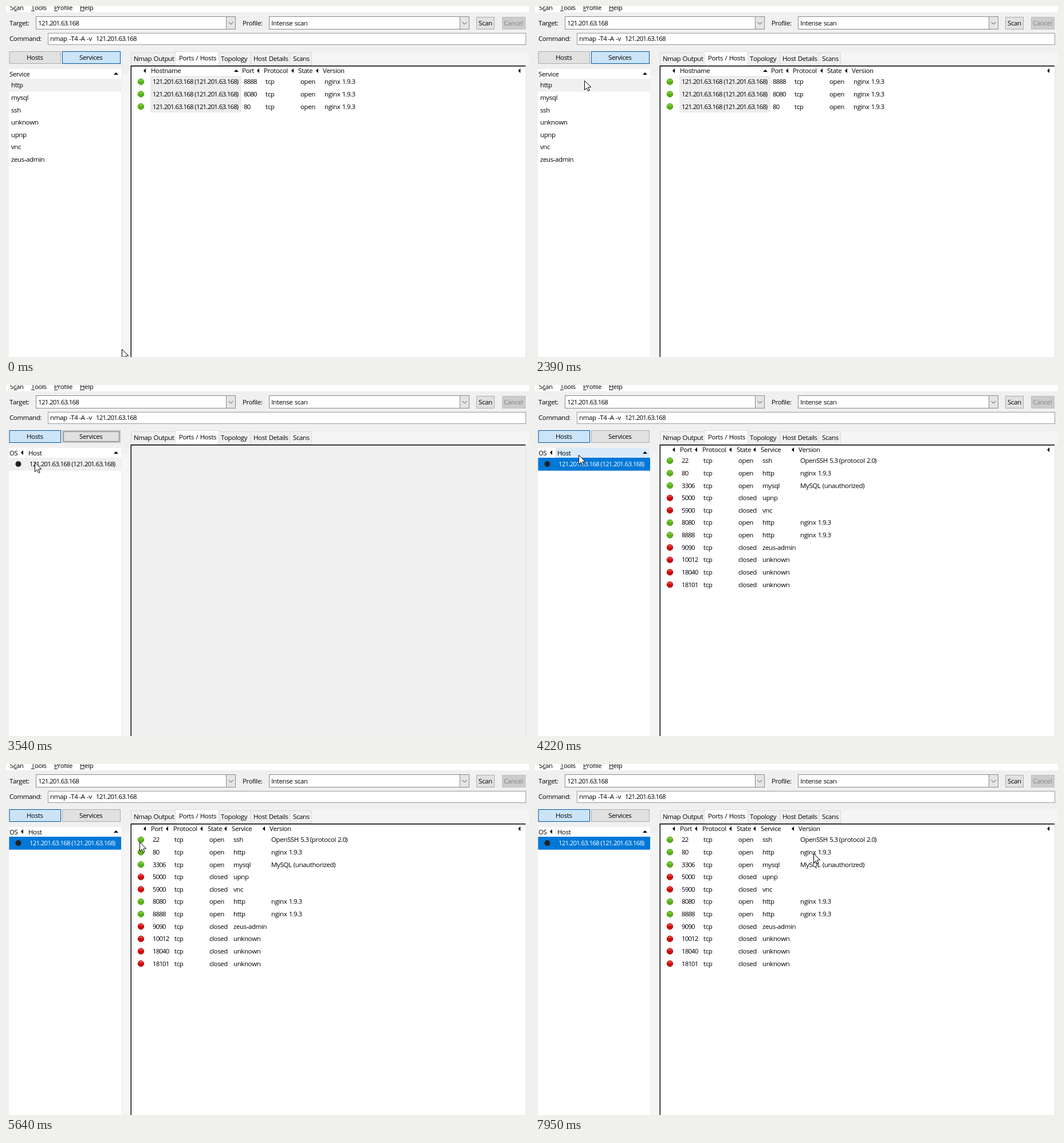
Animation, 913 px wide and 613 px high, one loop 7.99 s. Source, as an HTML page with a canvas:

```html
<!DOCTYPE html>
<html lang="en">
<head>
<meta charset="utf-8">
<title>Port scan results</title>
<style>
  html, body { margin: 0; width: 100%; height: 100%; overflow: hidden; background: #f0f0f0; }
  canvas { display: block; }
</style>
</head>
<body>
<canvas id="stage" width="913" height="613"></canvas>
<script>
const ctx = document.getElementById('stage').getContext('2d');
const LOOP = 7990, SHOW_HOSTS = 2720, CLEAR = 3540, SHOW_PORTS = 3570;
const IP = '121.201.63.168', HOST = `${IP} (${IP})`;
const SERVICES = ['http', 'mysql', 'ssh', 'unknown', 'upnp', 'vnc', 'zeus-admin'];
const HTTP_PORTS = ['8888', '8080', '80'];
const PORTS = [
  '22 open ssh OpenSSH 5.3 (protocol 2.0)', '80 open http nginx 1.9.3',
  '3306 open mysql MySQL (unauthorized)', '5000 closed upnp', '5900 closed vnc',
  '8080 open http nginx 1.9.3', '8888 open http nginx 1.9.3', '9090 closed zeus-admin',
  '10012 closed unknown', '18040 closed unknown', '18101 closed unknown'
];
// Pointer stops: time, x, y
const PATH = [
  [280, 202, 599], [840, 272, 131], [1120, 272, 131], [1400, 343, 134], [1880, 30, 136],
  [1920, 30, 136], [2130, 62, 158], [2390, 86, 130], [2600, 58, 89], [2720, 58, 89],
  [3350, 50, 135], [3870, 50, 135], [4220, 76, 122], [4640, 120, 89], [4760, 120, 89],
  [5300, 246, 136], [5550, 234, 137], [5640, 233, 136], [6000, 272, 184], [6370, 250, 142],
  [6410, 250, 142], [7050, 558, 139], [7200, 558, 139], [7450, 568, 137], [7950, 486, 156]
];

function pointerAt(t) {
  const i = PATH.findIndex(p => p[0] > t);
  if (i === 0) return PATH[0].slice(1);
  if (i < 0) return PATH.at(-1).slice(1);
  const [t0, x0, y0] = PATH[i - 1], [t1, x1, y1] = PATH[i];
  const u = (t - t0) / (t1 - t0), k = u * u * (3 - 2 * u);
  return [Math.round(x0 + (x1 - x0) * k), Math.round(y0 + (y1 - y0) * k)];
}

function rect(x, y, w, h, fill, border) {
  ctx.fillStyle = fill;
  ctx.fillRect(x, y, w, h);
  if (!border) return;
  ctx.strokeStyle = border;
  ctx.lineWidth = 1;
  ctx.strokeRect(x + .5, y + .5, w - 1, h - 1);
}

// Digits are set tighter than letters; y is the middle of the line.
function text(s, x, y, color = '#000') {
  ctx.font = '11.5px "Open Sans", "Noto Sans", sans-serif';
  ctx.fontKerning = 'none';
  ctx.wordSpacing = '0.8px';
  ctx.fillStyle = color;
  for (const run of s.match(/\d+|\D+/g)) {
    ctx.letterSpacing = /\d/.test(run) ? '-0.88px' : '-0.4px';
    ctx.fillText(run, x, Math.round(y) + 4);
    x += ctx.measureText(run).width;
  }
}

function shape(points, fill, stroke) {
  ctx.beginPath();
  points.forEach(([x, y]) => ctx.lineTo(x, y));
  ctx.closePath();
  ctx.fillStyle = fill;
  ctx.fill();
  if (stroke) { ctx.strokeStyle = stroke; ctx.lineWidth = 1; ctx.stroke(); }
}

const leftArrow = (x, y) => shape([[x - 2, y], [x + 2, y - 4], [x + 2, y + 4]], '#000');
const upArrow = (x, y) => shape([[x - 4, y + 2], [x, y - 2], [x + 4, y + 2]], '#000');
const rowY = i => 132.3 + i * 21.63;

function disc(x, y, r, fill, border) {
  ctx.beginPath();
  ctx.arc(x, y, r, 0, 7);
  ctx.fillStyle = fill;
  ctx.fill();
  if (border) { ctx.strokeStyle = border; ctx.lineWidth = 1; ctx.stroke(); }
}

function led(y, open) {
  const g = ctx.createLinearGradient(0, y - 5, 0, y + 5);
  const colors = open ? ['#83cf43', '#6cc424', '#4fa80f', '#69bd28'] : ['#ee5a5a', '#e01818', '#c40000', '#dc1c1c'];
  [0, .45, .55, 1].forEach((stop, i) => g.addColorStop(stop, colors[i]));
  disc(235.5, y, 5.2, g, open ? '#47911a' : '#a30b0b');
}

function combo(x, w, value) {
  rect(x, 18, w, 23, '#fff', '#8a8a8a');
  rect(x + w - 17, 18, 17, 23, '#e5e5e5', '#8a8a8a');
  const cx = x + w - 8.5;
  ctx.beginPath();
  ctx.moveTo(cx - 4, 28); ctx.lineTo(cx, 32); ctx.lineTo(cx + 4, 28);
  ctx.strokeStyle = '#444';
  ctx.stroke();
  text(value, x + 4.3, 30);
}

function toggle(x, w, label, labelX, active, hover) {
  const [fill, border] = active ? ['#cce4f7', '#00579f'] : hover ? ['#e5f1fb', '#0078d7'] : ['#e1e1e1', '#adadad'];
  rect(x, 79, w, 22, fill, border);
  text(label, labelX, 90);
}

function drawFrame() {
  rect(0, 0, 913, 613, '#f0f0f0');
  rect(0, 0, 913, 11, '#fff');
  rect(218, 81, 695, 23, '#f5f5f5');
  rect(202, 120, 14, 493, '#f5f5f5');
  [['Scan', 7, 14, 5], ['Tools', 44, 44, 6], ['Profile', 84, 84, 6], ['Help', 129, 129, 8]].forEach(([label, x, ux, uw]) => {
    text(label, x, 3);
    rect(ux, 8, uw, 1, '#000');
  });
  text('Target:', 6, 30);
  combo(52, 349, IP);
  text('Profile:', 413, 30);
  combo(459, 350, 'Intense scan');
  rect(821, 19, 32, 22, '#e1e1e1', '#adadad');
  text('Scan', 825, 30);
  rect(866, 19, 41, 22, '#cccccc', '#bfbfbf');
  text('Cancel', 869, 30, '#838383');
  text('Command:', 6, 57);
  rect(73, 47, 835, 21, '#fff', '#9a9a9a');
  text('nmap -T4 -A -v', 77, 57);
  text(IP, 157, 57);

  [['Nmap Output', 218, 295, 223], ['Topology', 371, 427, 375], ['Host Details', 427, 495, 432], ['Scans', 495, 533, 501]]
    .forEach(([label, x0, x1, tx]) => {
      rect(x0, 81, x1 - x0 + 1, 23, '#f0f0f0', '#d9d9d9');
      text(label, tx, 92);
    });
  rect(295, 79, 77, 26, '#fff', '#d9d9d9');
  text('Ports / Hosts', 302, 91);
}

function drawSidebar(t, px, py) {
  const hosts = t >= SHOW_HOSTS, selected = t >= SHOW_PORTS;
  const onButtons = py >= 79 && py < 101, onHeader = py >= 110 && py < 127;
  toggle(5.6, 90.4, 'Hosts', 36, hosts, onButtons && px >= 5 && px < 96);
  toggle(98, 102, 'Services', 128, !hosts, onButtons && px >= 98 && px < 200);
  if (hosts && !selected) {
    ctx.setLineDash([1, 1]);
    ctx.strokeStyle = '#000';
    ctx.strokeRect(100.5, 81.5, 97, 17);
    ctx.setLineDash([]);
  }
  rect(5, 110, 196, 503, '#fff');
  const headX = hosts ? 37 : 5;
  if (onHeader && px >= headX && px < 200) rect(headX, 110, 200 - headX, 17, '#d9ebf9');
  upArrow(192, 118);
  rect(5.4, 127, 195.6, 22.6, selected ? '#0078d7' : '#f0f0f0');
  if (hosts) {
    text('OS', 6, 119);
    leftArrow(28, 118);
    rect(36, 111, 1, 15, '#e0e0e0');
    text('Host', 39, 119);
    disc(21.5, 138, 5, '#222');
    text(HOST, 41, 138, selected ? '#fff' : '#000');
  } else {
    text('Service', 6, 119);
    SERVICES.forEach((name, i) => text(name, 9, rowY(i) + 6));
  }
}

function headers(columns, arrows) {
  columns.forEach(([label, x]) => text(label, x, 113.4));
  [242, ...arrows, 896].forEach(x => leftArrow(x, 113));
}

function drawResults(t) {
  if (t < CLEAR || t >= SHOW_PORTS) rect(219, 105, 688, 508, '#fff');
  rect(219, 105, 688, 1, '#777');
  rect(217, 104, 1, 509, '#909090');
  rect(218, 104, 689, 1, '#000');
  rect(218, 104, 1, 509, '#000');
  rect(907, 104, 1, 509, '#e3e3e3');
  if (t < CLEAR) {
    rect(252, 122, 159, 64, '#ededed');
    headers([['Hostname', 253], ['Port', 412], ['Protocol', 450], ['State', 510], ['Version', 553]], [440, 500, 543]);
    upArrow(402, 113);
    HTTP_PORTS.forEach((port, i) => {
      const y = rowY(i);
      led(y, true);
      text(HOST, 256, y);
      text(port, 415, y);
      text('tcp', 453, y);
      text('open', 514, y);
      text('nginx 1.9.3', 556, y);
    });
  } else if (t >= SHOW_PORTS) {
    headers([['Port', 253], ['Protocol', 292], ['State', 352], ['Service', 394], ['Version', 460]], [281, 341, 383, 450]);
    PORTS.forEach((row, i) => {
      const [port, state, service, ...version] = row.split(' '), y = rowY(i);
      led(y, state === 'open');
      text(port, 256, y);
      text('tcp', 294, y);
      text(state, 355, y);
      text(service, 397, y);
      if (version.length) text(version.join(' '), 463, y);
    });
  }
}

function drawPointer(x, y) {
  const outline = [[0, 0], [0, 16], [3.7, 12.6], [6.3, 18], [8.6, 17], [6.2, 11.6], [11.2, 11.2]];
  shape(outline.map(([dx, dy]) => [x + .5 + dx, y + .5 + dy]), '#fff', '#000');
}

function render(now) {
  const t = now % LOOP, [px, py] = pointerAt(t);
  drawFrame();
  drawSidebar(t, px, py);
  drawResults(t);
  drawPointer(px, py);
}

const start = performance.now();
function tick() {
  render(performance.now() - start);
  requestAnimationFrame(tick);
}
tick();
</script>
</body>
</html>
```
